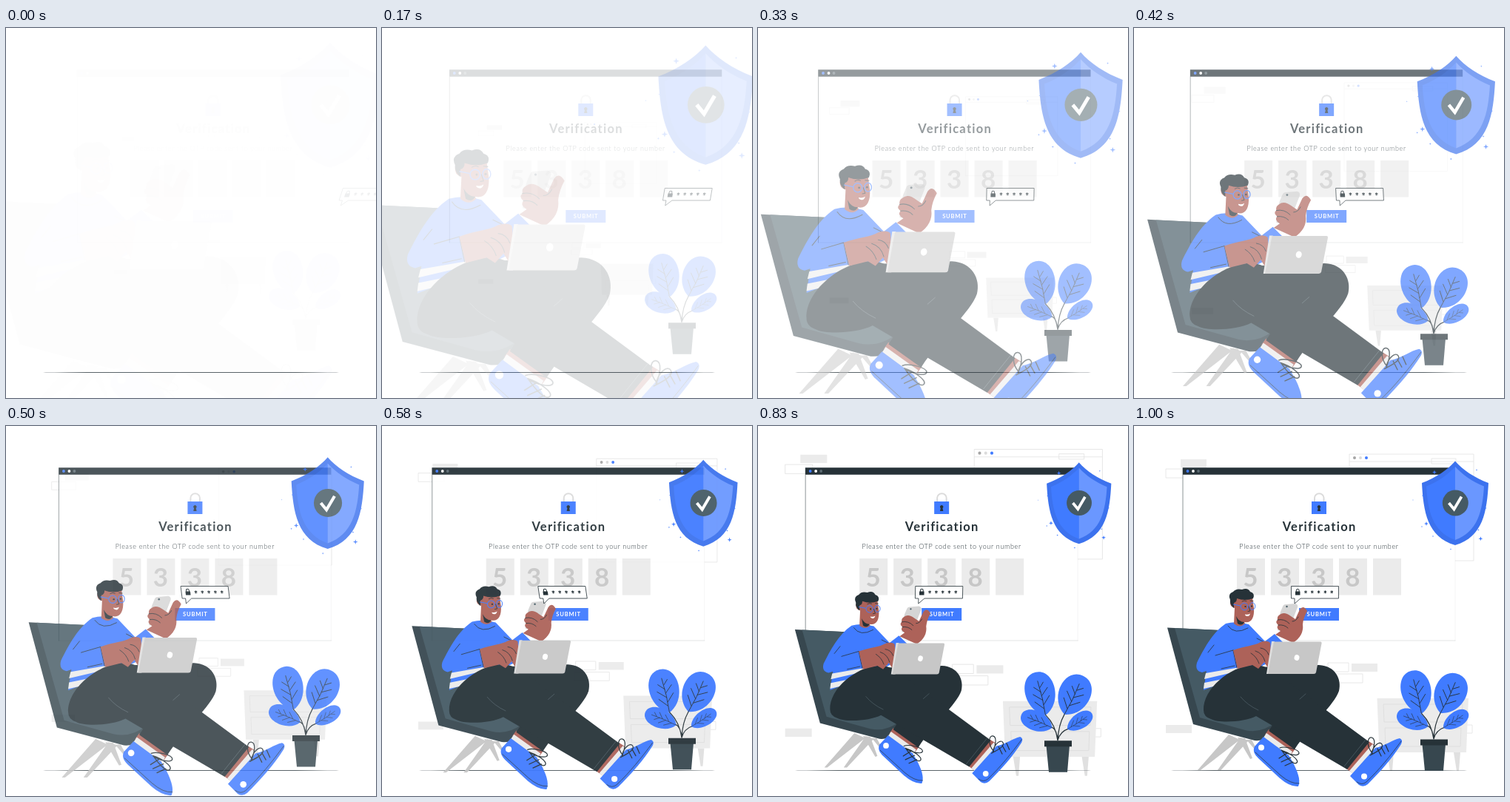
An HTML page that plays this animation: 500x500 px, repeating every 1040 ms.

```html
<!DOCTYPE html>
<html lang="en">
<head>
<meta charset="utf-8">
<title>Verification</title>
<style>
html, body { margin: 0; height: 100%; overflow: hidden; background: #fff; }
svg { display: block; width: 100vw; height: 100vh; }
text { font-family: Lato, "Open Sans", sans-serif; text-anchor: middle; }
.blue { fill: #407bff; } .dark { fill: #263238; } .skin { fill: #ad6259; }
.pale { fill: #ebebeb; } .grey { fill: #c7c7c7; } .white { fill: #fff; }
.line { fill: none; stroke: #263238; stroke-linecap: round; stroke-linejoin: round; }
.thin { fill: none; stroke: #e2e2e2; stroke-width: .8; }
</style>
</head>
<body>
<svg viewBox="0 0 500 500">
<defs>
  <g id="leaf">
    <path class="blue" d="M0 0C-28-12-26-58 0-58S28-12 0 0"/>
    <path class="line" stroke-width=".8" d="M0 0Q2-22 0-46M0-9l-10-11M1-14l10-10M1-20l-11-10M1-26l10-9M1-31l-8-8M1-37l6-6"/>
  </g>
</defs>

<g id="back">
  <g class="thin">
    <path d="M291 38H459V182H291ZM291 48H459M402 44H435V51H402ZM43 58H79V70H43ZM262 320H290V332H262ZM260 335H309V347H260ZM440 404H457V415H440Z"/>
  </g>
  <circle cx="298" cy="43" r="2" fill="#a6a6a6"/>
  <circle cx="306" cy="43" r="2" fill="#dbdbdb"/>
  <circle cx="314" cy="43" r="2" class="blue"/>
  <path class="pale" d="M63 45h35v11H63ZM294 321h35v11H294ZM43 404h35v11H43Z"/>
  <path fill="#e0e0e0" d="M342 441h9l-2 25h-3ZM432 441h9l-2 25h-3Z"/>
  <path class="pale" d="M328.500 368H452L449 441H331.500Z"/>
  <path fill="none" stroke="#dcdcdc" stroke-width=".8" d="M337 376H444L443 400H338ZM339 408H442L441 433H340Z"/>
</g>

<ellipse class="dark" cx="250" cy="465.400" rx="200" ry=".45"/>

<g id="panel">
  <path class="white" d="M66 56H434V290H66Z"/>
  <path class="line" stroke-width=".7" opacity=".75" d="M66 66V290"/>
  <path class="line" stroke-width=".6" opacity=".22" d="M66 290H434"/>
  <path class="line" stroke-width=".5" opacity=".1" d="M434 66V290"/>
  <path class="dark" d="M65.700 56.300H434V65.700H65.700Z"/>
  <circle class="blue" cx="72.500" cy="61" r="1.900"/>
  <circle class="white" cx="80" cy="61" r="1.900"/>
  <circle fill="#5b6a72" cx="87" cy="61" r="1.900"/>
  <path fill="none" stroke="#dbdbdb" stroke-width="2" d="M244 103V97a6 5.500 0 0 1 12.500 0V103"/>
  <path class="blue" d="M240 102h20v17h-20Z"/>
  <path class="dark" d="M250 107a2.200 2.200 0 0 1 1.300 4l.9 4h-4.400l.9-4a2.200 2.200 0 0 1 1.300-4"/>
  <text class="dark" x="250.600" y="141.500" font-size="16.500" font-weight="700" letter-spacing="1.250">Verification</text>
  <text class="dark" x="250" y="166" font-size="9" font-weight="300" letter-spacing=".68">Please enter the OTP code sent to your number</text>
  <g id="code"></g>
  <path class="blue" d="M223 246h54v17h-54Z"/>
  <text class="white" x="250.400" y="257.400" font-size="7.600" font-weight="700" letter-spacing=".8">SUBMIT</text>
</g>

<g id="shield">
  <path fill="#3c72ee" d="M434 47.500C424 59 408 70 389 77C391 115 396 150 434 161C472 150 477 115 479 77C460 70 444 59 434 47.500"/>
  <path class="blue" d="M434 55C424 66 411 75 395 81.500C397 114 403 143 434 154Z"/>
  <path fill="#6a97ff" d="M434 55C444 66 457 75 473 81.500C471 114 465 143 434 154Z"/>
  <circle fill="#455a64" cx="434.300" cy="104" r="17.500"/>
  <path fill="none" stroke="#fff" stroke-width="3.800" d="M425.500 104l7 8.500 10-17"/>
  <g id="sparks" class="blue"></g>
</g>

<g id="plant">
  <g class="line" stroke-width="1.200">
    <path d="M405 423Q402 402 389 389M405 423Q406 402 414 388M405 423Q404 409 397 405M405 423Q408 411 420 407"/>
  </g>
  <use href="#leaf" transform="translate(388.500 389) rotate(-13) scale(1 1.030)"/>
  <use href="#leaf" transform="translate(414 388) rotate(26) scale(1.060 1)"/>
  <use href="#leaf" transform="translate(397.500 406) rotate(-67) scale(.65 .78)"/>
  <use href="#leaf" transform="translate(418 408) rotate(57) scale(.52 .68)"/>
  <path fill="#37474f" d="M389.500 430H421L418 466H393Z"/>
  <path class="dark" d="M387 423.500h37v8h-37Z"/>
</g>

<g id="man">
  <path class="grey" d="M128 417L86 465h4L143 424ZM144 421L113 465h4.500L155 425ZM140 421l17 29 3-1-10-27ZM152 424l12 14 2-1-7-13Z"/>
  <path fill="#37474f" d="M45 272.500L116 276L150 380L196 402Q183 427 163 425L80 403Z"/>
  <path fill="#455a64" d="M55 273L116 276L150 380L192 400Q172 416 150 411L89 394Z"/>

  <path class="skin" d="M182 410L218 436L213 443L177 417Z"/>
  <path class="pale" d="M179 415L214 440L209 449L173 424Z"/>
  <path class="blue" d="M175 420L163 433C160 439 163 444 168 449L197 476Q211 488 222 487C226 478 220 465 215 455L209 445Z"/>
  <path class="line" stroke-width=".7" d="M164 441L198 472Q212 484 223 483"/>
  <circle class="white" cx="172" cy="434.500" r="4"/>
  <path class="line" stroke-width="1.200" d="M197 435C204 432 223 437 223 442S207 444 199 438C209 441 224 451 220 455S206 448 200 439M196 449l11-7M199 454l13-6M204 459l11-5"/>
  <path class="dark" d="M165 326L250 323C272 324 281 342 277 358C270 378 240 402 217 437L182 412L200 385Z"/>

  <path class="blue" d="M124 267C106 279 94 302 85 320Q82 331 92 333L98 331L94 357L150 335L186 318L202 293L190 281L177 291L155 268Q138 263 124 267"/>
  <path class="pale" d="M97 334L143 326L142 331L95 342ZM95 347L130 340L120 349L94 355Z"/>
  <path class="line" stroke-width=".8" d="M127 270q9 13 27 3M134 303L110 310M108 296l-8 10M176 292l-10-5M134 303l5 24M118 328l18-4"/>

  <path fill="#d5d5d5" d="M201 244Q202 241 205 241L218 240Q222 241 221 245L214 263L200 277L194 276Q194 258 201 244"/>
  <circle fill="#455a64" cx="206.500" cy="244" r="1.200"/>
  <path class="skin" d="M197 255Q203 250 212 257L218 261L224 248Q229 241 234 250Q229 259 228 268Q230 283 215 293L191 282L198 277Q191 273 195 269Q190 265 194 262Q193 257 197 255"/>
  <path class="line" stroke-width=".8" d="M194 262q9-2 16 5M195 269q8-1 13 4M214 264q5 0 8-6"/>

  <path class="skin" d="M133 235Q128 236 131 243Q134 246 136 246L135 267Q143 274 150 267L149 265C158 267 163 260 162 246L160 232Q145 225 133 235"/>
  <path class="dark" d="M135 246L135 239Q139 238 139 233Q150 237 161 233Q164 226 157 224Q154 218 146 221Q138 219 134 224Q126 227 130 235Q129 241 135 246"/>
  <path class="dark" d="M138 257Q142 265 149 265Q146 271 140 267Z"/>
  <g fill="none" stroke="#407bff" stroke-width="1">
    <circle cx="149" cy="244" r="4.800"/><ellipse cx="160" cy="243.500" rx="3.800" ry="4.800"/><path d="M134 241l10 2"/>
  </g>
  <circle class="dark" cx="150.500" cy="244" r="1.100"/><circle class="dark" cx="159" cy="243.500" r="1.100"/>
  <path class="line" stroke-width=".8" d="M146 237q3-2 6-.5M157 236l4 .5M155 244l2 6-3 .5"/>
  <path class="white" d="M150 254.500q4 1 7-1-1 4-4 3.500t-3-2.500"/>

  <path class="skin" d="M317 426L325 431L295 469L287 463Z"/>
  <path class="pale" d="M322 430L330 436L301 474L291 466Z"/>
  <path class="blue" d="M326 435C340 432 349 424 359 422Q364 424 361 430C350 448 332 468 316 484Q310 489 304 485L292 473Z"/>
  <path class="line" stroke-width=".7" d="M361 426C347 445 331 465 314 481Q308 486 301 481"/>
  <circle class="white" cx="311" cy="473.500" r="4"/>
  <path class="line" stroke-width="1.200" d="M322 442C314 433 315 420 321 421S325 434 321 443C323 432 332 425 335 430S329 440 319 445M329 436l5 10M334 434l5 9M340 431l4 9"/>
  <path class="dark" d="M94 384C93 355 130 325 160 323C178 322 190 332 200 340L318 427L288 464L165 392C150 400 115 402 104 396Q94 393 94 384"/>
  <path class="line" style="stroke:#52626a" stroke-width=".7" d="M144 366Q153 377 168 384M232 362l-8 7M313 424L284 460"/>

  <path class="skin" d="M134 303C150 297 163 297 171 292Q180 289 184 293L186 314L181 327L176 319L168 328L160 323L140 328Z"/>
  <path class="line" stroke-width=".8" d="M164 304q10 3 13 14M158 307q8 5 11 14M171 300q8 1 11 9"/>
  <path fill="#dedede" d="M186 291H190L185 335H179Z"/>
  <path class="grey" d="M189 291.500H252Q254 291.500 253.500 294L246 333Q245.500 335 243 335H181Z"/>
  <ellipse class="white" cx="220" cy="313" rx="3.400" ry="4" transform="rotate(15 220 313)"/>
</g>

<g id="bubble">
  <path class="white" stroke="#263238" stroke-width=".8" d="M212.500 216.500H276.500V233H225L217 240V233H212.500Z"/>
  <path class="dark" d="M218 223.500h6.500v5H218Z"/>
  <path class="line" stroke-width="1" d="M219.300 224v-1.800a1.900 1.900 0 0 1 3.800 0V224"/>
  <g id="dots" class="line" stroke-width="1"></g>
</g>
</svg>
<script>
const el = id => document.getElementById(id);

el('code').innerHTML = ['5', '3', '3', '8', ''].map((digit, i) => {
  const x = 139 + 46 * i;
  return `<path class="pale" d="M${x} 179h38v49.500h-38Z"/>
    <text class="grey" x="${x + 18.5}" y="216.500" font-size="35" font-weight="700">${digit}</text>`;
}).join('');

el('dots').innerHTML = [0, 1, 2, 3, 4].map(i =>
  `<path d="M${232 + 8.8 * i} 222.700v3.200m-1.400-2.400l2.800 1.600m0-1.600l-2.800 1.600"/>`).join('');

// four-pointed sparkles: x, y, radius
el('sparks').innerHTML = [
  [406, 62.4, 3], [463, 59.4, 1.2], [475, 111, 1.6], [465.4, 140.4, 1.3], [468.4, 152.3, 3],
  [428, 166.5, 1.3], [395, 132, 3], [389, 136, 1.2], [404, 149, 1.3], [390.5, 94, 1.6], [377, 100, .8]
].map(([x, y, r]) => {
  const a = r * .25;
  return `<path d="M${x} ${y - r}l${a} ${r - a} ${r - a} ${a} ${a - r} ${a} ${-a} ${r - a} ${-a} ${a - r} ${a - r} ${-a} ${r - a} ${-a}Z"/>`;
}).join('');

// cubic-bezier(.36, -.01, .5, 1.38)
const curve = (s, a, b) => 3 * a * s * (1 - s) ** 2 + 3 * b * s * s * (1 - s) + s ** 3;
function ease(p) {
  let lo = 0, hi = 1;
  for (let i = 0; i < 30; i++) {
    const mid = (lo + hi) / 2;
    if (curve(mid, .36, .5) < p) lo = mid; else hi = mid;
  }
  return curve(hi, -.01, 1.38);
}

function pose(id, transform, opacity) {
  el(id).setAttribute('transform', transform);
  el(id).setAttribute('opacity', Math.min(1, Math.max(0, opacity)));
}
const zoom = (cx, cy, s) => `translate(${cx} ${cy}) scale(${s}) translate(${-cx} ${-cy})`;
const mix = (a, b, k) => a + (b - a) * k;

function skewAt(p) {
  if (p < .6) return mix(-20, 10, p / .6);
  if (p < .8) return mix(10, -2, (p - .6) / .2);
  return mix(-2, 0, (p - .8) / .2);
}

const LOOP = 1040, STEP = 1000 / 24;

function draw(now) {
  const step = Math.floor((now % LOOP + 4) / STEP);
  const p = Math.min(1, (step + 1) / 24);
  const e = p < 1 ? ease(p) : 1, rest = 1 - e;
  pose('back', zoom(250, 250, 1 - rest / 2), e);
  pose('panel', `translate(${30 * rest} 0)`, e);
  pose('shield', zoom(426, 104.5, 1 + rest / 2), e);
  pose('plant', `translate(0 ${-30 * rest})`, e);
  pose('man', zoom(204, 353, 1 + rest / 2), e);
  const shift = 257 * Math.max(0, 1 - p / .6);
  pose('bubble', `translate(${245 + shift} 228) skewX(${skewAt(p)}) translate(-245 -228)`, p / .6);
}

const start = performance.now();
function tick() {
  draw(performance.now() - start);
  requestAnimationFrame(tick);
}
tick();
</script>
</body>
</html>
```
